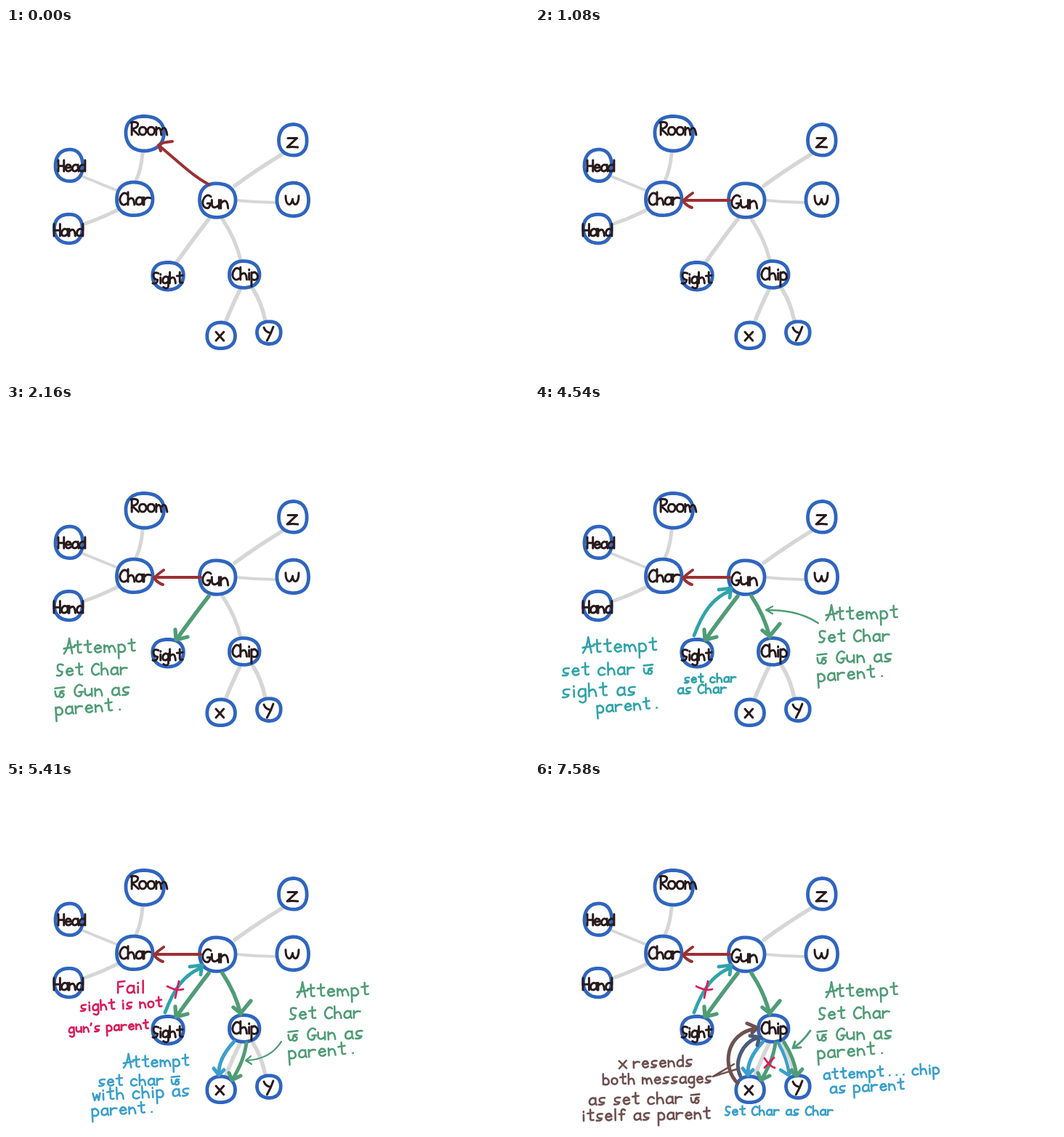
Animation of 720x480 px, one loop 8000 ms. Source, as an HTML page:

```html
<!DOCTYPE html>
<html lang="en">
<head>
<meta charset="utf-8">
<title>Parenting messages</title>
<style>
  html, body { margin: 0; width: 100%; height: 100%; overflow: hidden; background: #fff; }
  svg { display: block; width: 720px; height: 480px; }
  path { fill: none; stroke-linecap: round; stroke-linejoin: round; vector-effect: non-scaling-stroke; }
</style>
</head>
<body>
<svg id="stage" viewBox="0 0 720 480"></svg>
<script>
const LOOP = 8000;
const STARTS = [0, 1080, 2160, 3240, 5410, 7580];
const BLUE = '#2f65bf', GREY = '#d6d6d6', RED = '#9b3032', GREEN = '#4f9c76', TEAL = '#30a3aa',
      SKY = '#3a9fcc', PINK = '#d81e5b', BROWN = '#6e504f', SLATE = '#4b5b7b', INK = '#291a1c';

// Handwriting: pen strokes on a baseline at 0, x-height 10, capitals about 17.
const bowl = 'M8-8C4-13 0-8 0-4S4 2 8-3', belly = 'M0-8C4-13 8-8 8-4S4 2 0-1';
const arch = 'M0-6Q7-14 8 0', stem = 'M0-10V0', tall = 'M0-17V0', hook = 'V5Q6 10 1 6';
const lower = {
  a: bowl + 'M8-10V-2L9 0', b: tall + belly, c: 'M8-8C4-13 0-8 0-4S4 2 8-1',
  d: bowl + 'M8-17V0', e: 'M0-5L8-6Q7-11 3-10Q-1-7 1-2Q4 2 8-2',
  f: 'M8-15Q3-19 3-12V0M0-9H7', g: bowl + 'M8-10' + hook, h: tall + arch,
  i: 'M1-9V0M1-14V-13', l: 'M1-17V0', m: 'M0-10V0M0-6Q5-14 6 0M6-6Q11-14 13 0',
  n: stem + arch, o: 'M4-10C-2-10-1 0 4 0S10-10 4-10', p: 'M0-10V9' + belly,
  r: stem + 'M0-6Q3-11 8-9', s: 'M8-10Q1-11 1-7T7-3Q6 1 0 0',
  t: 'M4-17V-2Q5 0 8-1M0-11L8-12', u: 'M0-10V-4Q2 2 8-4V-10V0',
  w: 'M0-10L2 0L5-8L7 0L9-10', y: 'M0-10Q1-2 8-5M9-10Q6 0 2 8'
};
const upper = {
  A: 'M-1 0Q4-6 6-21L9 0M-1-7L12-9', C: 'M9-14C4-20-1-10 0-5S5 2 9-2',
  F: 'M9-16L1-15V0M1-8L7-9', G: 'M9-14C4-20-1-10 0-5S8 3 8-6H5H10',
  H: 'M0-17V0M8-17V0M0-8H8', R: 'M1-16V0M0-16C12-19 10-8 1-8L9 0',
  S: 'M8-15Q1-18 1-12T7-5Q6 2 0 0', W: 'M0-12C0 0 6 3 8-8C8 1 15 2 15-12',
  X: 'M0-12L10 0M10-12L0 0', Y: 'M0-13Q2-7 7-6M12-14Q9-4 4 5', Z: 'M1-14H13L0-1Q7-2 14-1'
};
const marks = { '.': 'M5-1H5.4', "'": 'M1-16L0-12', '&': 'M0-12L11-13M0-8Q0 1 4-1Q6-3 6-7M10-8H7Q7-5 10-4Q10 1 6 0' };
const glyphs = { ...lower, ...upper, ...marks };
const widths = { m: 13, i: 2, l: 2, '.': 6, "'": 2, '&': 11, ' ': 4 };   // "&" is a joined "is"

const labelHand = { gap: 2, squat: 0.92, pen: 3 };
const noteHand = { gap: 4, squat: 0.87, pen: 2.6 };

const stroke = (d, color, width) => `<path d="${d}" stroke="${color}" stroke-width="${width}"/>`;

function write(text, x, y, size, tilt, color, hand) {
  let at = 0, out = '';
  for (const ch of text) {
    if (glyphs[ch]) out += `<g transform="translate(${at} 0)">${stroke(glyphs[ch], color, hand.pen)}</g>`;
    at += (widths[ch] ?? 8) + hand.gap;
  }
  return `<g role="img" aria-label="${text.replace('&', 'is')}" ` +
    `transform="translate(${x} ${y}) rotate(${tilt}) scale(${size} ${size * hand.squat})">${out}</g>`;
}
const note = (color, ...lines) => lines.map(line => write(...line, color, noteHand)).join('');

// Circle drawn by an unsteady hand, a little square at the diagonals.
function ring(x, y, rx, ry) {
  let d = '';
  for (let i = 0; i <= 48; i++) {
    const a = i / 48 * 2 * Math.PI;
    const r = 1.01 - 0.02 * Math.cos(4 * a) + 0.012 * Math.sin(3 * a + x);
    d += `${i ? 'L' : 'M'}${(x + rx * r * Math.cos(a)).toFixed(1)} ${(y + ry * r * Math.sin(a)).toFixed(1)}`;
  }
  return stroke(d + 'Z', BLUE, 4.8);
}

const nodes = [
  // label, centre, radii, label start, label size
  ['Room', 191, 145, 26.5, 24, 172, 147, 1.16],
  ['Head', 87, 189, 19, 22, 72, 197, 0.97],
  ['Hand', 86, 276, 19.5, 20, 66, 286, 1.05],
  ['Char', 177, 235, 25, 23, 157, 243, 1.1],
  ['Gun', 291, 237, 25, 23.5, 271, 248, 1.24],
  ['Z', 395, 154, 19.5, 21.5, 387, 165, 1.05],
  ['W', 395, 236, 22, 23, 385, 244, 1.2],
  ['Sight', 223, 341, 21.5, 19, 202, 351, 0.98],
  ['Chip', 328, 339, 21, 18.5, 312, 346, 1.08],
  ['X', 296, 423, 19.5, 18, 289, 430, 1.08],
  ['Y', 362, 419, 16.5, 15.5, 355, 425, 1.08]
];

const gunSight = 'M279 263Q258 290 235 322', gunChip = 'M298 263Q316 290 323 319';
const edges = [
  ['M188 173Q186 195 179 210', 5], ['M105 204L154 224', 4], ['M109 269Q130 262 154 250', 5],
  [gunSight, 5.5], [gunChip, 5], ['M322 360Q312 380 302 405', 5.5], ['M340 359Q352 378 357 403', 5.5],
  ['M315 217Q345 195 381 173', 5.5], ['M317 237Q345 240 372 240', 4]
].map(([d, w]) => stroke(d, GREY, w)).join('');

const instruction = note(GREEN, ['Attempt', 81, 342, 1.14, -2], ['Set Char', 70, 372, 1.1, -1],
  ['& Gun as', 68, 402, 1.17, -2], ['parent.', 69, 426, 1.14, -4]);

// [first step, last step, markup]
const parts = [
  [0, 5, edges + nodes.map(([, ...n]) => ring(...n)).join('')],
  [0, 0, stroke('M279 215C255 202 235 182 211 162M229 156Q215 157 210 161L213 169', RED, 4)],
  [1, 5, stroke('M268 237H204M217 227Q206 235 204 238Q209 245 216 247', RED, 4)],
  [2, 5, stroke(gunSight + 'M233 309L234 323L250 319', GREEN, 5.3)],
  [2, 2, instruction],
  [3, 5, `<g transform="translate(321 -46)">${instruction}</g>`],
  [3, 5, stroke(gunChip + 'M313 310L323 318L337 301', GREEN, 5.3)],
  [3, 5, stroke('M219 317C231 285 245 265 268 256M253 254L270 252L268 265', TEAL, 4.8)],
  [3, 3, stroke('M390 300C365 284 340 282 319 282M327 277L318 282L327 287', GREEN, 2.3) +
    note(TEAL, ['Attempt', 67, 341, 1.18, -2], ['set char &', 38, 372, 1.12, -1], ['sight as', 38, 402, 1.22, -2],
      ['parent.', 86, 423, 1.06, -4], ['set char', 206, 382, 0.8, -1], ['as Char', 197, 397, 0.87, -1])],
  [4, 5, stroke('M314 357C300 372 292 388 293 403M286 394L293 403L300 396', SKY, 5)],
  [4, 5, stroke('M331 359C328 380 320 395 312 409M307 400L311 410L323 404', GREEN, 5)],
  [4, 5, stroke('M222 281Q235 288 244 285M238 274L233 297', PINK, 2.8)],
  [4, 4, stroke('M379 357C368 375 350 382 331 383M337 377L330 383L338 388', GREEN, 2.3) +
    note(PINK, ['Fail', 153, 290, 1.15, 0], ['sight is not', 103, 315, 0.93, -3], ["gun's parent", 87, 345, 0.84, -3]) +
    note(SKY, ['Attempt', 163, 393, 1.04, -2], ['set char &', 128, 418, 1, -1],
      ['with chip as', 120, 438, 1.1, -3], ['parent.', 119, 459, 1.06, -3])],
  [5, 5, stroke('M335 359Q347 380 350 402M338 396L349 403L354 396', SKY, 4.5) +
    stroke('M343 358Q357 380 360 402M352 397L360 404L368 395', GREEN, 5) +
    stroke('M379 342Q368 358 355 366M358 357L355 366L366 365', GREEN, 3) +
    stroke('M316 380Q324 392 330 393M329 379L316 393', PINK, 2.8) +
    stroke('M279 414C258 395 260 345 305 339M292 332L306 338L299 345', BROWN, 5) +
    stroke('M283 405C273 385 285 358 308 351M296 349L309 351L306 362', SLATE, 5) +
    stroke('M274 388L245 405L281 394', BROWN, 2.6) +
    note(BROWN, ['X resends', 116, 394, 1, -2], ['both messages', 94, 416, 0.97, -1],
      ['as set char &', 75, 444, 1.06, -1], ['itself as parent', 66, 466, 1.04, -1]) +
    note(SKY, ['attempt... chip', 398, 409, 0.96, -3], ['as parent', 407, 428, 1.01, -3],
      ['Set Char as Char', 262, 458, 0.84, 0])],
  [0, 5, nodes.map(([text, , , , , x, y, size]) => write(text, x, y, size, 0, INK, labelHand)).join('')]
];

const stage = document.getElementById('stage');
stage.innerHTML = parts.map(part => `<g>${part[2]}</g>`).join('');
const groups = [...stage.children];
const origin = performance.now();

function draw(now) {
  const time = Math.max(0, now - origin) % LOOP;
  const step = STARTS.filter(start => start <= time).length - 1;
  parts.forEach(([first, last], i) => {
    groups[i].style.display = step >= first && step <= last ? '' : 'none';
  });
  requestAnimationFrame(draw);
}
draw(origin);
</script>
</body>
</html>
```
